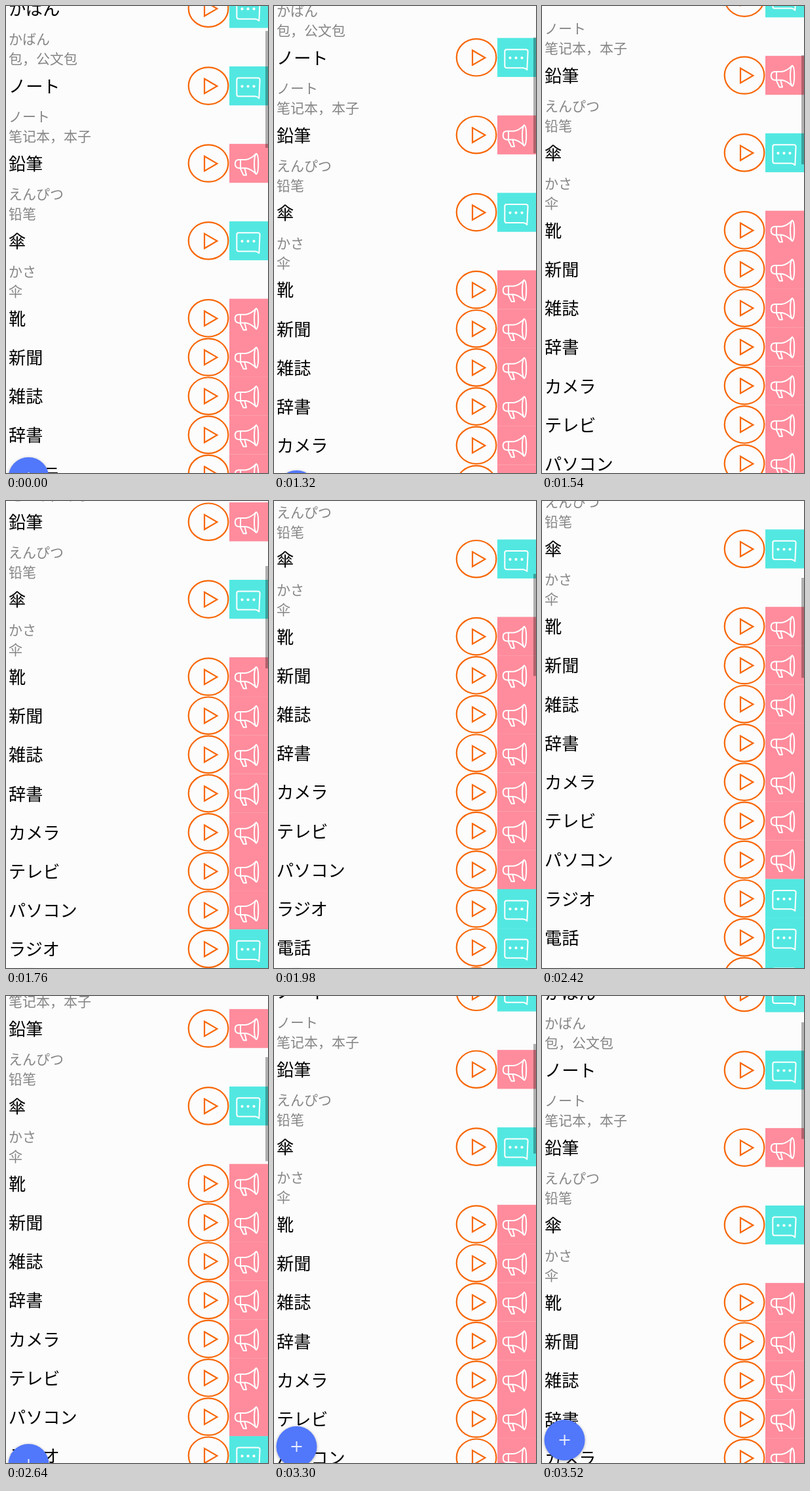
These frames come from a looping animation (400 px wide and 711 px high, 3630 ms). An HTML page:

```html
<!DOCTYPE html>
<html lang="ja">
<head>
<meta charset="utf-8">
<title>Word list</title>
<style>
  @property --scroll { syntax: "<number>"; inherits: true; initial-value: 0; }
  @property --bar { syntax: "<number>"; inherits: true; initial-value: 38; }
  @property --fab { syntax: "<number>"; inherits: true; initial-value: 687; }

  html, body { margin: 0; width: 100%; height: 100%; overflow: hidden; background: #fcfcfc; }
  svg { display: block; }
  #stage { position: fixed; inset: 0; width: 100%; height: 100%; animation: drag 3630ms step-end infinite; }

  #list { transform: translateY(calc(var(--scroll) * -1px)); }
  #fab { transform: translate(34.5px, calc(var(--fab) * 1px + 31px)); filter: drop-shadow(0 1px 2px rgba(0, 0, 0, .3)); }
  #thumb {
    y: calc(var(--bar) * 1px);
    height: calc((216 + .187 * var(--scroll) - var(--bar)) * 1px);
    fill: rgba(0, 0, 0, .3);
  }

  text { font-family: "Noto Sans CJK JP", "Noto Sans CJK", "Noto Sans", sans-serif; }
  .word { font-size: 26.2px; font-weight: 500; fill: #000; }
  .note { font-size: 21px; fill: #858585; }
  .note:lang(zh) { font-family: "Noto Sans CJK SC", "Noto Sans CJK", "Noto Sans", sans-serif; }
  .play { fill: none; stroke: #f76707; stroke-width: 2.2; }
  .icon { fill: none; stroke: #fff; stroke-width: 2; stroke-linejoin: round; stroke-linecap: round; }

  /* Drag down the list, ease off, then drag back; one step is 110 ms */
  @keyframes drag {
    0%     { --scroll: 0;     --bar: 38;  --fab: 687; }
    36.36% { --scroll: 43.3;  --bar: 48;  --fab: 707; }
    39.39% { --scroll: 90;    --bar: 62;  --fab: 712; }
    42.42% { --scroll: 134;   --bar: 75;  --fab: 712; }
    45.45% { --scroll: 174;   --bar: 88;  --fab: 712; }
    48.48% { --scroll: 207.8; --bar: 99;  --fab: 712; }
    51.51% { --scroll: 240;   --bar: 105; --fab: 712; }
    54.54% { --scroll: 269.2; --bar: 111; --fab: 712; }
    57.57% { --scroll: 280;   --bar: 115; --fab: 712; }
    60.6%  { --scroll: 286;   --bar: 117; --fab: 712; }
    63.63% { --scroll: 288;   --bar: 118; --fab: 712; }
    66.66% { --scroll: 284.5; --bar: 117; --fab: 712; }
    69.69% { --scroll: 246;   --bar: 106; --fab: 705; }
    72.72% { --scroll: 190;   --bar: 93;  --fab: 682; }
    90.9%  { --scroll: 127.8; --bar: 73;  --fab: 655; }
    93.93% { --scroll: 62;    --bar: 54;  --fab: 645; }
    96.96% { --scroll: 8.8;   --bar: 40;  --fab: 645; }
    100%   { --scroll: 0;     --bar: 38;  --fab: 687; }
  }
</style>
</head>
<body>
<svg id="stage" viewBox="0 0 400 711" preserveAspectRatio="none">
  <defs>
    <g id="play" class="play">
      <ellipse cx="309" cy="29.6" rx="30.3" ry="28.2"/>
      <path d="M303 18.8L322.3 30L303 41.2Z"/>
    </g>
    <g id="chat">
      <path class="icon" d="M355 17.5H384.5Q387.7 17.5 387.6 20.7L386.3 48.5Q384 45.8 380.5 45.6H355.5Q352.3 45.6 352.3 42.4V20.7Q352.3 17.5 355 17.5Z"/>
      <g fill="#fff">
        <circle cx="360.5" cy="30.3" r="2.1"/>
        <circle cx="369.5" cy="30.3" r="2.1"/>
        <circle cx="378.5" cy="30.3" r="2.1"/>
      </g>
    </g>
    <g id="horn" class="icon">
      <path d="M366 24H355Q349.7 24.5 349.7 30.3T355 36.8H366Q374 38 382 46Q385.2 45 385.2 30.3T382 14.8Q374 23 366 24Z"/>
      <path d="M382 14.8Q379 18 379 30.3T382 46M358 24.2V36.6M357.5 37L362.5 47.5H367L364.3 37"/>
    </g>
  </defs>
  <rect width="400" height="711" fill="#fcfcfc"/>
  <g id="list"></g>
  <rect id="thumb" x="396" width="4"/>
  <g id="fab">
    <circle r="31" fill="#5177fb"/>
    <path d="M-8 0H8M0 -8V8" stroke="#e8edff" stroke-width="2"/>
  </g>
</svg>
<script>
  const ROW = 59.2, NOTES = 58.7;
  const words = [
    ["かばん", "chat", "かばん", "包，公文包"],
    ["ノート", "chat", "ノート", "笔记本，本子"],
    ["鉛筆", "horn", "えんぴつ", "铅笔"],
    ["傘", "chat", "かさ", "伞"],
    ["靴", "horn"],
    ["新聞", "horn"],
    ["雑誌", "horn"],
    ["辞書", "horn"],
    ["カメラ", "horn"],
    ["テレビ", "horn"],
    ["パソコン", "horn"],
    ["ラジオ", "chat"],
    ["電話", "chat"],
    ["時計", "chat"]
  ];
  const fills = { chat: "#52e8e1", horn: "#fe8c9c" };

  const label = (cls, y, str, lang = "ja") =>
    `<text class="${cls}" x="4" y="${y}" lang="${lang}">${str}</text>`;

  let rowY = -25.9;
  document.getElementById("list").innerHTML = words.map(([word, icon, kana, meaning]) => {
    const notes = kana ? label("note", 84, kana) + label("note", 114, meaning, "zh-CN") : "";
    const row = `<g transform="translate(0 ${rowY.toFixed(1)})">
      <rect x="341" width="59" height="${ROW + 0.1}" fill="${fills[icon]}"/>
      <use href="#play"/><use href="#${icon}"/>
      ${label("word", 40, word)}${notes}</g>`;
    rowY += ROW + (kana ? NOTES : 0);
    return row;
  }).join("");
</script>
</body>
</html>
```
